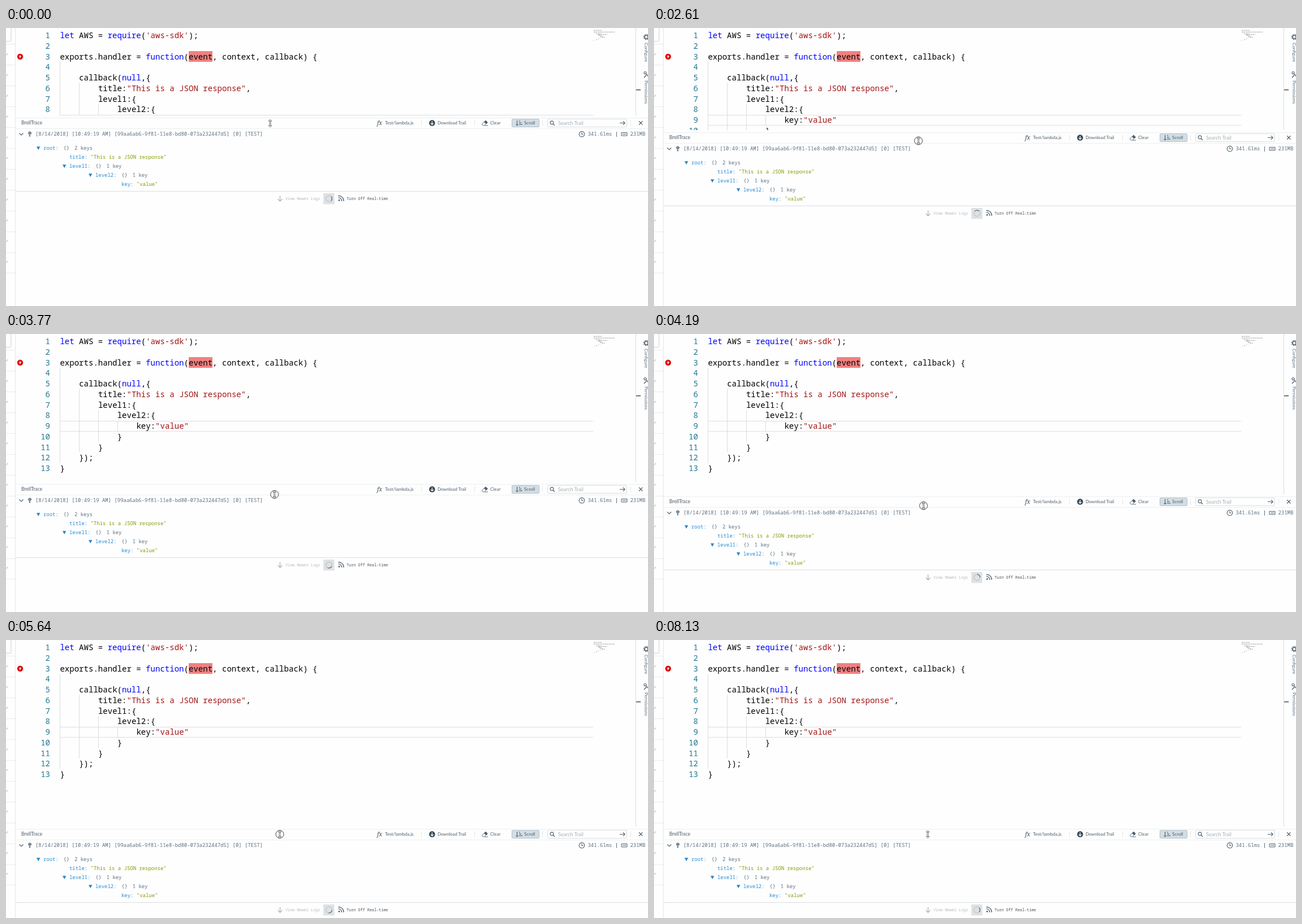
An HTML page that plays this animation: 1135 by 493 pixels, repeating every 8.23 s.

```html
<!DOCTYPE html>
<html lang="en">
<head>
<meta charset="utf-8">
<title>Resizable log panel</title>
<style>
  html, body { margin: 0; width: 100%; height: 100%; overflow: hidden; background: #fefefe; }
  svg { display: block; width: 1135px; height: 493px; }
  text { white-space: pre; }
  .code { font: 14.06px "Noto Sans Mono", monospace; }
  .log { font: 8.95px "Noto Sans Mono", monospace; fill: #5c7080; }
  .foot { font: 6.8px "Noto Sans Mono", monospace; }
  .ui { font: 8px Lato, sans-serif; fill: #4a5b69; }
  .line { fill: none; stroke: #4f6170; stroke-width: 1.1; }
</style>
</head>
<body>
<svg id="stage" viewBox="0 0 1135 493"></svg>
<script>
const LOOP = 8230;
const INK = '#4f6170';
const ROW = 18.75;
const CHAR = 8.437;
const range = n => [...Array(n).keys()];
const esc = s => s.replace(/&/g, '&amp;').replace(/</g, '&lt;');

// drawing helpers
const rect = (x, y, w, h, fill, extra = '') =>
  `<rect x="${x}" y="${y}" width="${w}" height="${h}" fill="${fill}" ${extra}/>`;
const text = (x, y, s, cls, extra = '') =>
  `<text x="${x}" y="${y}" class="${cls}" ${extra}>${esc(s)}</text>`;
const path = (d, extra = '') => `<path class="line" d="${d}" ${extra}/>`;
const solid = (d, fill) => `<path d="${d}" fill="${fill}"/>`;
const ring = (x, y, r, extra = '') => `<circle class="line" cx="${x}" cy="${y}" r="${r}" ${extra}/>`;
const paint = (color, width = 1.1) => `style="stroke:${color};stroke-width:${width}"`;

const source = [
  "let AWS = require('aws-sdk');",
  '',
  'exports.handler = function(event, context, callback) {',
  '',
  '    callback(null,{',
  '        title:"This is a JSON response",',
  '        level1:{',
  '            level2:{',
  '                key:"value"',
  '            }',
  '        }',
  '    });',
  '}'
];

function highlight(line) {
  return line.split(/('[^']*'|"[^"]*"|\b(?:let|require|function|null)\b)/).map((part, i) => {
    if (i % 2 === 0) return esc(part);
    const color = /^['"]/.test(part) ? '#a31515' : '#0000ff';
    return `<tspan fill="${color}">${part}</tspan>`;
  }).join('');
}

function editor() {
  const guide = (x, first, last) =>
    rect(x, 3.7 + ROW * (first - 1), 1, ROW * (last - first + 1), '#dcdcdc');
  const lines = source.map((line, i) => {
    const y = 18 + ROW * i;
    const body = line.trimStart();
    const x = 95.4 + CHAR * (line.length - body.length);
    return text(78, y, String(i + 1), 'code', 'fill="#237893" text-anchor="end"') +
      `<text class="code" x="${x}" y="${y}">${highlight(body)}</text>`;
  });
  return rect(323, 41, 42, 19, '#f08080') +
    guide(95, 4, 12) + guide(129, 6, 11) + guide(163, 8, 10) + guide(197, 9, 9) +
    rect(96, 154, 942, 1, '#dedede') + rect(96, 172, 942, 1, '#dedede') +
    lines.join('') +
    '<circle cx="25" cy="50.7" r="5.2" fill="#e10a0a"/>' +
    solid('M25.8 47.3L22.7 51.3H24.7L24.1 54.2L27.3 50H25.3Z', '#fff');
}

function minimap() {
  const rows = [[0, 14], [0, 0], [0, 27], [2, 0], [4, 9], [8, 16], [8, 5], [11, 5], [14, 6], [11, 1], [8, 1], [4, 2], [0, 1]];
  return rows.map(([x, w], i) =>
    path(`M${1039 + x} ${4.2 + i * 1.5}h${w}`, 'stroke-dasharray="3 .8" ' + paint('#8d8d8d', .8))).join('') +
    path('M1066 7.2h10', 'stroke-dasharray="3 .8" ' + paint('#8d8d8d', .8));
}

function leftRail() {
  const marks = range(11).map(i => {
    const y = 46.5 + 36.8 * i;
    return path(`M-1 ${y + 1.5}L0 ${y + 2}L3.5 ${y - 1.5}`, paint('#8a9299', .9));
  });
  const rules = range(12).map(i => rect(0, Math.round(28 + 36.95 * i), 16, 1, '#e8ebec'));
  return rect(16, 0, 1, 493, '#e3e6e8') + rules.join('') + marks.join('') +
    `<rect x="-10" y="-10" width="19" height="33.5" rx="2" fill="none" stroke="#ccd0d3"/>`;
}

function rightRail() {
  const label = (y, s) => text(0, 0, s, 'ui', `style="fill:#5c7080" transform="translate(1129 ${y}) rotate(90)"`);
  return rect(1113, 0, 1, 493, '#d9dcde') + rect(1114, 109, 8, 1.3, '#333') +
    ring(1132, 16, 3, paint(INK, 1.5)) +
    ring(1132, 16, 4.6, 'stroke-dasharray="2 1.6" ' + paint(INK, 1.3)) +
    ring(1130, 79.5, 2, paint(INK, 1.2)) + path('M1131.5 81.5L1137 87M1128 88L1132 83.5', paint(INK, 1.3)) +
    label(26, 'Configure') + label(93, 'Permissions');
}

function toolbar() {
  const bars = [734, 828, 948, 1104].map(x => rect(x, 163, 1, 11, '#e3e7e9')).join('');
  return rect(17, 159, 1118, 1, '#eceff0') + rect(17, 178, 1118, 1, '#eceff0') + bars +
    text(27, 171.3, 'BrellTrace', 'ui', 'style="font-size:8.6px"') +
    text(656, 171.5, 'fx', '', 'style="font:italic 10.5px \'Noto Serif\',serif;fill:#394b59"') +
    text(670, 171.3, 'Test/lambda.js', 'ui') +
    '<circle cx="753.3" cy="168.4" r="5.3" fill="#394b59"/>' +
    path('M753.3 165.3V171M750.8 168.8L753.3 171.3L755.8 168.8', paint('#fff', 1.2)) +
    text(763, 171.3, 'Download Trail', 'ui', 'style="font-size:7.7px"') +
    path('M842 169.5L848 164L851.5 167.5L845.5 173H843.5L841.5 171ZM846 173H852', paint(INK, .9)) +
    solid('M845 166.8L848 164L851.5 167.5L848.5 170.3Z', INK) +
    text(856, 171.3, 'Clear', 'ui') +
    rect(894.5, 161.5, 48, 14, '#d3dde4', 'stroke="#b3c0c9" rx="1"') +
    path('M903.5 164V173M901.3 170.8L903.5 173L905.7 170.8M907 165H909M907 168H911M907 171H913', paint('#394b59', 1)) +
    text(916, 171.3, 'Scroll', 'ui') +
    rect(957.5, 161.5, 140, 14, '#fff', 'stroke="#d8dde0" rx="1.5"') +
    ring(965, 167.8, 2.9) + path('M967.2 170L970 172.8', paint(INK, 1.3)) +
    text(976, 171.6, 'Search Trail', 'ui', 'style="font-size:9px;fill:#a7afb5"') +
    path('M1085 168.5H1094M1090.8 165.2L1094.2 168.5L1090.8 171.8', paint(INK, 1.1)) +
    path('M1119 165.2L1125.4 171.6M1125.4 165.2L1119 171.6', paint('#394b59', 1.1));
}

function logEntry() {
  const key = 'style="fill:#268bd2"', value = 'style="fill:#859900"';
  const branch = (x, y, name, count) => {
    const brace = x + CHAR_LOG * (name.length + 2.6);
    return solid(`M${x - 12} ${y - 2.8}h6.4l-3.2 6z`, '#2a86c8') +
      text(x, y + 3.2, name + ':', 'log', key) +
      text(brace, y + 3.2, '{}', 'log') +
      text(brace + 19.5, y + 3.2, count, 'log');
  };
  const leaf = (x, y, name, val) =>
    text(x, y + 3.2, name + ':', 'log', key) +
    text(x + CHAR_LOG * (name.length + 2), y + 3.2, `"${val}"`, 'log', value);
  return path('M23.5 186.5L27 190L30.5 186.5', paint(INK, 1.2)) +
    ring(42, 186.3, 2.4, paint(INK, 1)) +
    path('M39 186.3H45.5M42 184V193M40.5 191H43.5', paint(INK, 1)) +
    text(52, 191.3, '[8/14/2018] [10:49:19 AM] [99aa6ab6-9f81-11e8-bd80-073a232447d5] [0] [TEST]', 'log') +
    ring(1018, 188.2, 4.8) + path('M1018 185V188.5H1020.7') +
    text(1028.5, 191.3, '341.61ms', 'log') + rect(1079, 184, 1, 9, '#5c7080') +
    path('M1088 185.5H1098V191H1088ZM1090 188.2H1096.5', paint(INK, 1)) +
    text(1103.5, 191.3, '231MB', 'log') +
    branch(66, 213, 'root', '2 keys') +
    leaf(112, 229, 'title', 'This is a JSON response') +
    branch(112, 245, 'level1', '1 key') +
    branch(158, 261, 'level2', '1 key') +
    leaf(204, 277, 'key', 'value') +
    rect(17, 289, 1118, 1, '#dadddf');
}

function footer() {
  return path('M484.5 297.5V307M480.5 303.2L484.5 307.2L488.5 303.2', paint('#a8adb1', 1.2)) +
    text(494, 305.2, 'View Newer Logs', 'foot', 'fill="#b3b8bc"') +
    rect(561, 293, 19.5, 19.5, '#dfe2e4') +
    ring(571, 302.6, 5.4, paint('#c2c8cc', 1.5)) +
    `<g id="spinner">${path('M-3.82 -3.82A5.4 5.4 0 0 1 3.82 -3.82', paint('#6a7986', 1.5))}</g>` +
    '<circle cx="589" cy="305.5" r="1.4" fill="#4f6170"/>' +
    path('M587.5 301A5.5 5.5 0 0 1 593.5 307M587.5 297.5A9 9 0 0 1 597 307', paint(INK, 1.3)) +
    text(602, 305.2, 'Turn Off Real-time', 'foot', 'fill="#46525c"');
}

const CHAR_LOG = 5.37;
const pointer = ring(0, 0, 7, 'id="press" ' + paint('#333', .9)) +
  path('M-1 -4V4M1 -4V4M-2.8 -4L0 -7L2.8 -4ZM-2.8 4L0 7L2.8 4Z', paint('#444', .7));

const stage = document.getElementById('stage');
stage.innerHTML =
  `<g>${editor()}${minimap()}${rightRail()}</g>` +
  `<g id="panel">${rect(17, 155, 1118, 400, '#fefefe')}${toolbar()}${logEntry()}${footer()}</g>` +
  leftRail() + `<g id="pointer">${pointer}</g>`;

const panel = document.getElementById('panel');
const spinner = document.getElementById('spinner');
const cursor = document.getElementById('pointer');
const press = document.getElementById('press');

// [time, number of picture steps until the next entry]
const beats = [
  [0, 1], [120, 7], [1060, 1], [1200, 8], [2240, 1], [2360, 2], [2610, 4], [3210, 1],
  [3360, 1], [3490, 5], [4190, 2], [4460, 1], [4580, 3], [4970, 1], [5120, 3], [5490, 1],
  [5640, 6], [6450, 1], [6600, 1], [6750, 7], [7710, 1], [7860, 2], [8130, 1], [LOOP, 0]
];
// [time, panel offset, pointer x, pointer y]
const drag = [
  [0, 0, 467, 169], [1850, 0, 467, 169], [2240, 10, 467, 183], [2610, 26, 467.5, 200],
  [3210, 71.5, 471, 250], [3360, 86, 473, 265], [4190, 128.5, 476.5, 304.5],
  [4460, 145, 479, 321], [4970, 167.5, 482, 342.5], [5490, 177, 484, 347],
  [5640, 175.5, 484, 344.5], [LOOP, 175.5, 484, 344.5]
];
// [time, spinner angle]
const spin = [
  [0, 90], [2610, 1800], [3210, 2360], [4190, 2925], [4970, 3340], [6450, 4230], [8130, 5490], [LOOP, 5580]
];

const segment = (table, t) => {
  let i = 0;
  while (i < table.length - 2 && t >= table[i + 1][0]) i++;
  return [table[i], table[i + 1]];
};

function snap(t) {
  const [[start, n], [end]] = segment(beats, t);
  const step = (end - start) / n;
  return start + Math.floor((t - start) / step + 1e-6) * step;
}

function at(table, t) {
  const [a, b] = segment(table, t);
  const k = (t - a[0]) / (b[0] - a[0]);
  return a.slice(1).map((v, i) => v + (b[i + 1] - v) * k);
}

function draw(now) {
  const t = snap(now % LOOP);
  const [shift, x, y] = at(drag, t);
  const [angle] = at(spin, t);
  panel.setAttribute('transform', `translate(0 ${Math.round(shift)})`);
  cursor.setAttribute('transform', `translate(${x} ${y})`);
  spinner.setAttribute('transform', `translate(571 302.6) rotate(${angle})`);
  press.style.display = t >= 1590 && t < 6040 ? '' : 'none';
}

function tick() {
  draw(performance.now());
  requestAnimationFrame(tick);
}
tick();
</script>
</body>
</html>
```
